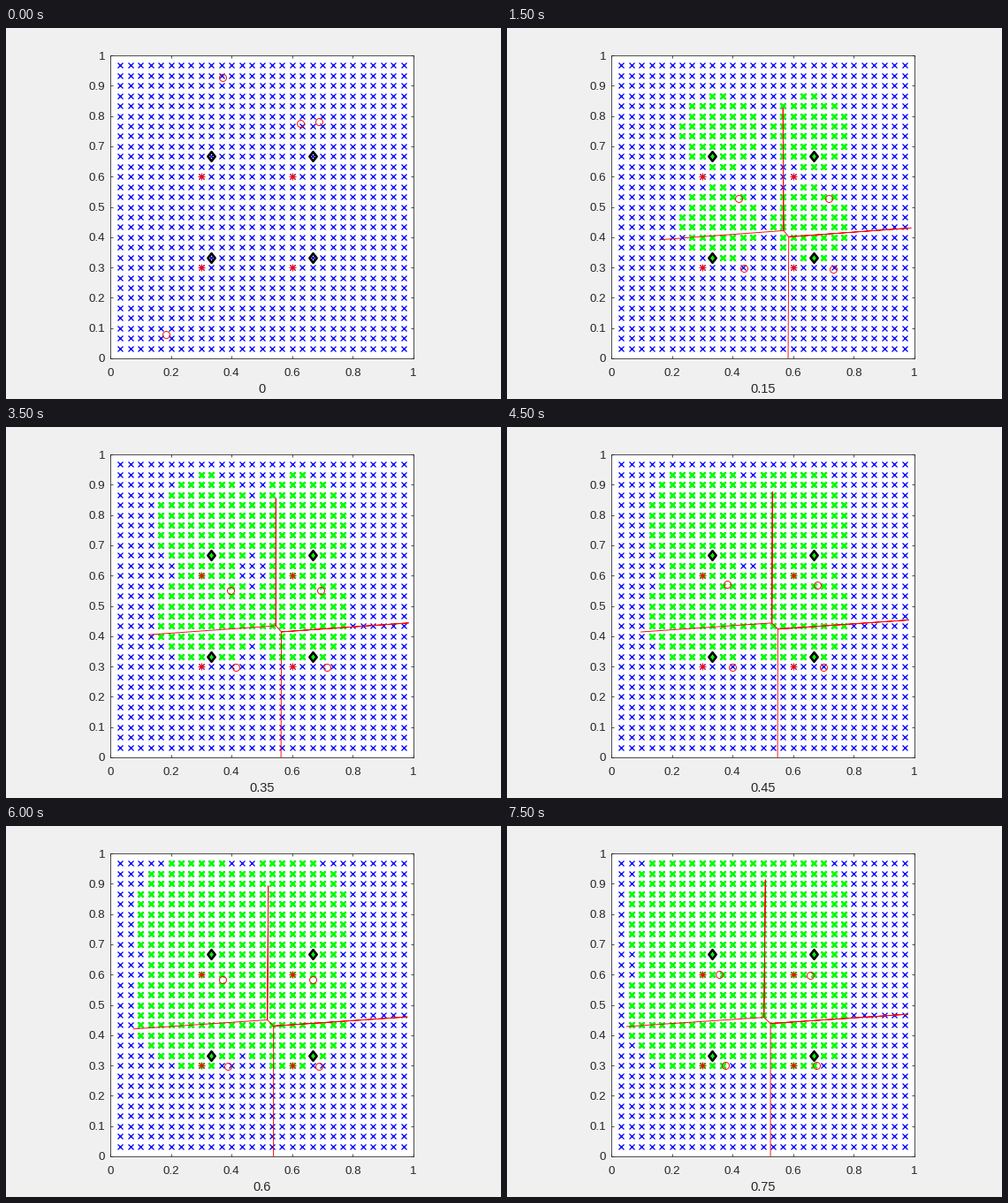
A matplotlib script that plays this animation: 560x420 px, repeating every 8000 ms.

```python
import numpy as np
import matplotlib.pyplot as plt
from matplotlib.animation import FuncAnimation
from matplotlib.path import Path

PX = 0.72  # points per pixel at 100 dpi
W, H = 560, 420
SIDE, X0, Y0 = 343, 118, 46
FRAMES, STEP, HOLD = 16, 0.05, 2.5
RED, GREEN, BLUE, DARK = "#ff0000", "#00ff00", "#0000ff", "#262626"

plt.rcParams["font.family"] = "Liberation Sans"

I, J = np.meshgrid(np.arange(1, 30), np.arange(1, 30))
SOURCES = [(x, y) for x in (9, 18) for y in (9, 18)]  # in grid cells

# agents: upper left, upper right, lower left, lower right
SCATTERED = np.array([(0.37, 0.928), (0.626, 0.775), (0.688, 0.78), (0.184, 0.08)])[[0, 1, 3, 2]]
NEAR = np.array([(0.397, 0.552), (0.695, 0.552), (0.415, 0.297), (0.713, 0.296)])
SETTLED = np.array([(0.355, 0.6), (0.655, 0.597), (0.375, 0.299), (0.675, 0.299)])


def covered(t):
    """Grid points inside four puffs that grow like a cube root and drift up-left."""
    if t == 0:
        return np.empty((0, 2))
    r = 6.96 * np.cbrt(t)
    dx, dy = 5.35 - r, 4.18 + 0.55 * (r - 3.2)
    power = 1.9 + 1.2 * t
    inside = np.zeros(I.shape, bool)
    for x, y in SOURCES:
        inside |= abs((I - x - dx) / r) ** power + abs((J - y - dy) / r) ** power <= 1
    return np.column_stack([I[inside], J[inside]]) / 30


def agents_at(n):
    """Agents jump once per hold, closing in on their final places."""
    k = int(n // HOLD)
    if k == 0:
        return SCATTERED
    u = (1 - 0.72 ** (k - 2)) / (1 - 0.72 ** 4)
    return NEAR + u * (SETTLED - NEAR)


def hub(p, q, r):
    """Point at equal distance from three agents."""
    return np.linalg.solve(2 * np.array([q - p, r - p]), [q @ q - p @ p, r @ r - p @ p])


def ray(start, p, q, third, length):
    """End of the edge between p and q, pointing away from the third agent."""
    d = np.array([p[1] - q[1], q[0] - p[0]])
    d = d * (-np.sign(d @ (third - p)) / np.hypot(*d))
    return start + length * d


def voronoi(pts):
    ul, ur, ll, lr = pts
    a, b = hub(ul, ur, ll), hub(ur, ll, lr)
    size = 1.033 * np.hypot(*np.ptp(pts, axis=0))
    left, top = ray(a, ul, ll, ur, size), ray(a, ul, ur, ll, size)
    right, bottom = ray(b, ur, lr, ll, size), ray(b, ll, lr, ur, size)
    return np.array([left, a, top, a, b, right, b, bottom])


# ---- figure ----
fig = plt.figure(figsize=(W / 100, H / 100), dpi=100, facecolor="#f0f0f0")
ax = fig.add_axes([X0 / W, Y0 / H, SIDE / W, SIDE / H])
ax.set(xlim=(0, 1), ylim=(0, 1))
xt, yt = np.arange(0, 11, 2) / 10, np.arange(11) / 10
ax.set_xticks(xt, [f"{v:g}" for v in xt])
ax.set_yticks(yt, [f"{v:g}" for v in yt])
ax.tick_params(direction="in", top=True, right=True, length=3.4 * PX, width=0.8 * PX,
               color=DARK, labelcolor=DARK, labelsize=13.33 * PX)
ax.tick_params(axis="x", pad=11 * PX)
ax.tick_params(axis="y", pad=6 * PX)
for s in ax.spines.values():
    s.set(linewidth=0.8 * PX, color=DARK)
clock = fig.text(290 / W, 1 - 409 / H, "", ha="center", va="center",
                 color=DARK, fontsize=14.67 * PX)


def marks(x, y, marker, size, color, width, z):
    return ax.plot(x, y, ls="none", marker=marker, ms=size * PX, mfc="none",
                   mec=color, mew=width * PX, zorder=z)[0]


marks(I.ravel() / 30, J.ravel() / 30, "x", 5.66, BLUE, 1.3, 3)
fire = marks([], [], "x", 5.66, GREEN, 2.67, 4)

gem = Path([(0, 1), (0.78, 0), (0, -1), (-0.78, 0), (0, 1)], closed=True)
third = np.array([1, 2]) / 3
marks(np.repeat(third, 2), np.tile(third, 2), gem, 10.5, "#000000", 2.67, 5)

sx, sy = np.array(SOURCES).T / 30
marks(sx, sy, "+", 8, RED, 1, 6)
marks(sx, sy, "x", 5.66, RED, 1, 6)

web = ax.plot([], [], color=RED, lw=0.9 * PX, zorder=6)[0]
agents = marks([], [], "o", 8, RED, 0.9, 7)


def draw(n):
    t = n * STEP
    pts = agents_at(n)
    agents.set_data(*pts.T)
    web.set_data(*voronoi(pts).T)
    web.set_visible(n > 0)
    fire.set_data(*covered(t).T)
    clock.set_text(f"{t:.2g}")
    return agents, web, fire, clock


anim = FuncAnimation(fig, draw, frames=FRAMES, init_func=lambda: draw(0),
                     interval=500, repeat=True, repeat_delay=0, blit=False)
plt.show()
```
